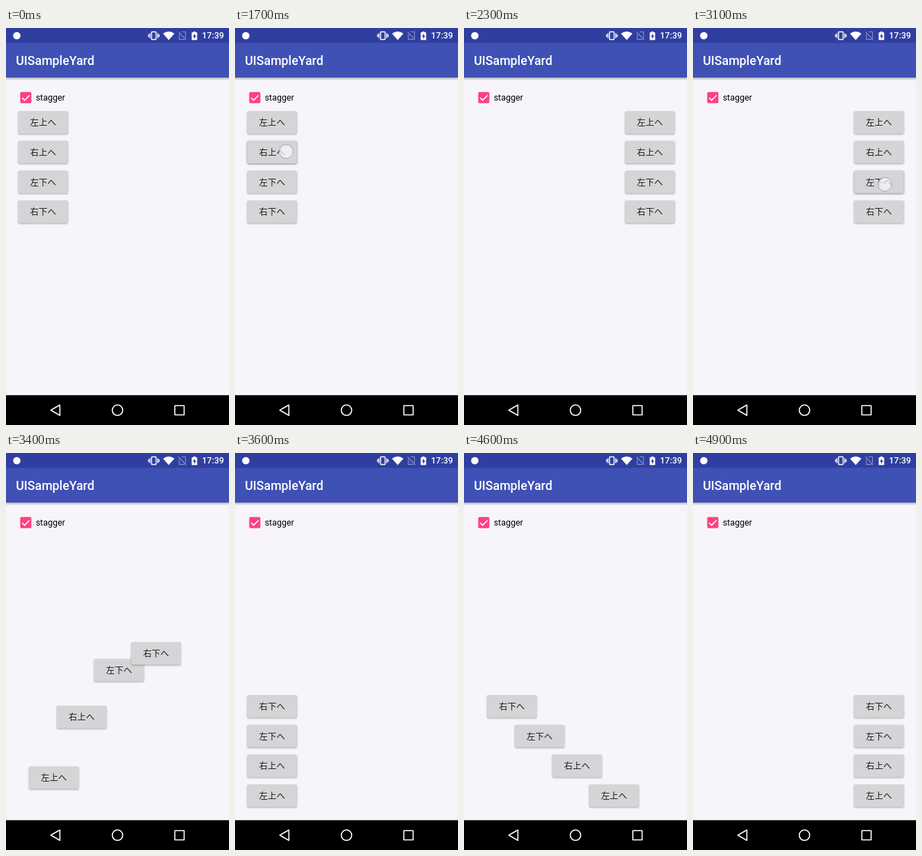
An HTML page that plays this animation: 320x569 px, repeating every 5100 ms.

```html
<!DOCTYPE html>
<html lang="ja">
<head>
<meta charset="utf-8">
<style>
html, body { margin: 0; height: 100%; overflow: hidden; background: #f7f5f9 }
svg { display: block; width: 100vw; height: 100vh }
text { font-family: Roboto, sans-serif; font-size: 12.44px }
.medium { font-weight: 500; fill: #fff }
.button { filter: drop-shadow(0 1px 1px #0005) }
.button.pressed { filter: drop-shadow(0 1.5px 1.8px #0007) }
.button text { font-family: "Noto Sans CJK JP", "Noto Sans CJK", sans-serif; text-anchor: middle; fill: #1c1c1c }
</style>
</head>
<body>
<svg viewBox="0 0 320 569">
  <defs>
    <linearGradient id="shade" x2="0" y2="1">
      <stop stop-color="#000" stop-opacity=".28"/>
      <stop offset="1" stop-color="#000" stop-opacity="0"/>
    </linearGradient>
  </defs>
  <rect width="320" height="569" fill="#f7f5f9"/>
  <rect y="71" width="320" height="4" fill="url(#shade)"/>
  <rect width="320" height="71" fill="#3f51b5"/>
  <rect width="320" height="21.3" fill="#303f9f"/>

  <!-- status bar -->
  <circle cx="15.5" cy="11" r="5.3" fill="#fff"/>
  <g fill="none" stroke="#fff" stroke-width="1.4">
    <rect x="208.8" y="5.5" width="6.6" height="11" rx=".8"/>
    <path d="M206.5 7.5v7M204.6 9v4M217.7 7.5v7M219.6 9v4"/>
  </g>
  <path d="M225.3 8Q233.5 1.8 241.7 8L233.5 17.3z" fill="#fff"/>
  <g fill="none" stroke="#8991c8" stroke-width="1.1">
    <path d="M252 5.5h5.5v9M248.7 8.7v7.7h7.5M247.5 5.5l11 11.5"/>
  </g>
  <path d="M266.5 6.3h2.3V5h3.2v1.3h2.3v10.9h-7.8z" fill="#fff"/>
  <path d="M271.2 7.8l-3.2 4.6h2v3.3l3-4.7h-1.8z" fill="#303f9f"/>
  <text class="medium" x="281.3" y="15.3">17:39</text>
  <text class="medium" x="14.2" y="53.2" style="font-size:17.78px">UISampleYard</text>

  <!-- checkbox -->
  <rect x="20.4" y="91.7" width="16" height="16" rx="1.8" fill="#ff4081"/>
  <path d="M23.2 100l3.5 3.5 7-7" fill="none" stroke="#fff" stroke-width="1.7"/>
  <text x="42.7" y="104.3">stagger</text>

  <g id="buttons"></g>
  <circle id="touch" r="9.8" fill="#f6f5fb" fill-opacity=".75" stroke="#8585b8" stroke-opacity=".5" stroke-width="1.2"/>

  <!-- navigation bar -->
  <rect y="526.3" width="320" height="43" fill="#000"/>
  <g fill="none" stroke="#fff" stroke-width="1.6" stroke-linejoin="round">
    <path d="M64.3 547.8L77.3 540.3V555.3z"/>
    <circle cx="160" cy="547.8" r="7.5"/>
    <rect x="242.3" y="541.2" width="13.3" height="13.3"/>
  </g>
</svg>
<script>
const LOOP = 5100, STEP = 100, DURATION = 300, STAGGER = 50;
const moves = [
  { press: 1700, start: 1752, x: 73.5, y: 177, button: 1, right: 1, bottom: 0 },
  { press: 3100, start: 3152, x: 275.3, y: 224, button: 2, right: 0, bottom: 1 },
  { press: 4300, start: 4398, x: 67.8, y: 364.3, button: 3, right: 1, bottom: 1 }
];
const group = document.getElementById('buttons');
const touch = document.getElementById('touch');

group.innerHTML = ['左上へ', '右上へ', '左下へ', '右下へ'].map(label =>
  `<g class="button"><rect width="71.2" height="32.2" rx="1.8" fill="#d5d5d7"/>
   <text x="35.6" y="21">${label}</text></g>`).join('');
const buttons = [...group.children];

const clamp = v => Math.max(0, Math.min(1, v));
const ease = v => (1 - Math.cos(Math.PI * clamp(v))) / 2;
const mix = (a, b, p) => a + (b - a) * p;

function place(corner, i) {
  return {
    x: corner.right ? 231.2 : 17.6,
    y: corner.bottom ? 347 + 42.67 * (3 - i) : 119.2 + 42.67 * i
  };
}

function draw(now) {
  const t = Math.floor(now % LOOP / STEP) * STEP;
  const current = moves.filter(m => t >= m.press).pop();

  buttons.forEach((button, i) => {
    let pos = place({ right: 0, bottom: 0 }, i);
    for (const m of moves) {
      const p = ease((t - m.start - i * STAGGER) / DURATION), end = place(m, i);
      pos = { x: mix(pos.x, end.x, p), y: mix(pos.y, end.y, p) };
    }
    button.setAttribute('transform', `translate(${pos.x} ${pos.y})`);
    button.classList.toggle('pressed', !!current && current.button === i && t < current.start);
  });

  // the touch spot fades once the finger lifts
  touch.setAttribute('opacity', current ? clamp(1 - (t - current.start + 30) / 200) : 0);
  if (current) {
    touch.setAttribute('cx', current.x);
    touch.setAttribute('cy', current.y);
  }
}

const origin = performance.now();
function tick() {
  draw(performance.now() - origin);
  requestAnimationFrame(tick);
}
tick();
</script>
</body>
</html>
```
